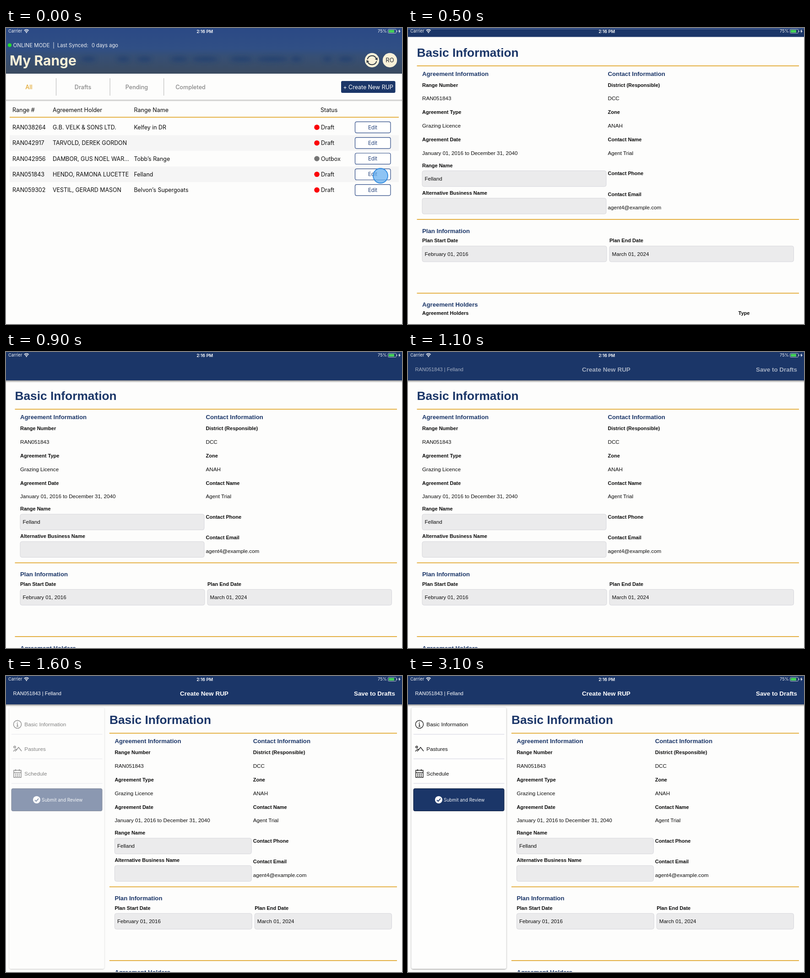
Write an HTML page that moves like this. It is 865 by 648 pixels and loops after 3.3 s.

```html
<!DOCTYPE html>
<html lang="en">
<head>
<meta charset="utf-8">
<title>Range plans</title>
<style>
  html, body { margin: 0; width: 100%; height: 100%; overflow: hidden; background: #fdfdfc; }
  svg { display: block; width: 865px; height: 648px; }
  text { font-family: "Liberation Sans", Arial, sans-serif; white-space: pre; }
  .ui { font-family: Inter, sans-serif; }
</style>
</head>
<body>
<svg id="stage" viewBox="0 0 865 648" xmlns="http://www.w3.org/2000/svg">
  <defs>
    <linearGradient id="sky" x2="0" y2="1">
      <stop offset="0" stop-color="#2b4985"/>
      <stop offset=".45" stop-color="#304f85"/>
      <stop offset=".6" stop-color="#364f76"/>
      <stop offset="1" stop-color="#3b4b60"/>
    </linearGradient>
    <linearGradient id="shade" x2="0" y2="1">
      <stop offset="0" stop-color="#000" stop-opacity=".42"/>
      <stop offset="1" stop-color="#000" stop-opacity="0"/>
    </linearGradient>
    <filter id="blur" x="-50%" y="-100%" width="200%" height="300%"><feGaussianBlur stdDeviation="4"/></filter>
    <filter id="lift" x="-5%" y="-5%" width="110%" height="110%">
      <feDropShadow dx="0" dy="1" stdDeviation="1.6" flood-opacity=".45"/>
    </filter>
  </defs>
</svg>
<script>
const NAVY = "#1b3668", GOLD = "#e2a830", PAPER = "#fdfdfc", CREAM = "#faf1d8", INK = "#0c0c0c";
const LOOP = 3300, STEP = 100;
const stage = document.getElementById("stage");

function add(parent, tag, attrs = {}, content) {
  const node = document.createElementNS("http://www.w3.org/2000/svg", tag);
  set(node, attrs);
  if (content !== undefined) node.textContent = content;
  parent.append(node);
  return node;
}
function set(node, attrs) {
  for (const key in attrs) node.setAttribute(key, attrs[key]);
}
const group = (parent, attrs) => add(parent, "g", attrs);
const rect = (parent, x, y, width, height, attrs) => add(parent, "rect", { x, y, width, height, ...attrs });
const circle = (parent, cx, cy, r, attrs) => add(parent, "circle", { cx, cy, r, ...attrs });
const path = (parent, d, attrs) => add(parent, "path", { d, fill: "none", ...attrs });
const text = (parent, x, y, size, content, attrs) =>
  add(parent, "text", { x, y, "font-size": size, fill: INK, ...attrs }, content);
const ui = (parent, x, y, size, content, attrs) => text(parent, x, y, size, content, { class: "ui", ...attrs });
const bold = (parent, x, y, size, content, attrs) =>
  text(parent, x, y, size, content, { "font-weight": 700, ...attrs });

const PLAN_ID = "RAN051843", PLAN_NAME = "Felland";

function buildList() {
  const list = group(stage);
  rect(list, 0, 0, 865, 648, { fill: PAPER });
  rect(list, 0, 157, 865, 4, { fill: "url(#shade)", opacity: .6 });
  rect(list, 0, 0, 865, 100, { fill: "url(#sky)" });

  const haze = group(list, { fill: "#24406f", filter: "url(#blur)", opacity: .75 });
  for (const [x, w] of [[180, 16], [256, 14], [302, 16], [378, 18], [435, 28], [514, 24], [582, 34], [634, 12], [702, 10], [742, 16]])
    add(haze, "ellipse", { cx: x, cy: 68, rx: w, ry: 6 });

  circle(list, 8, 37.5, 4, { fill: "#22e02c" });
  ui(list, 15.5, 41.8, 11.5, "ONLINE MODE", { fill: "#eef0f3" });
  rect(list, 103.5, 31, 1, 14, { fill: "#dfe3ea" });
  ui(list, 112, 41.8, 11.1, "Last Synced:", { fill: "#eef0f3" });
  ui(list, 187, 41.8, 11.1, "0 days ago", { fill: "#eef0f3" });
  ui(list, 8, 82, 30, "My Range", { fill: CREAM, "font-weight": 700 });

  circle(list, 799.5, 70.5, 15.7, { fill: CREAM });
  path(list, "M789.5 68.5A10.3 10.3 0 0 1 808.5 66M809.5 72.5A10.3 10.3 0 0 1 790.5 75",
    { stroke: "#333b44", "stroke-width": 2 });
  path(list, "M811.5 64.5v6.5l-6-3zM787.5 76.5v-6.5l6 3z", { fill: "#333b44" });
  circle(list, 838.5, 70.5, 15.7, { fill: CREAM });
  ui(list, 838.5, 75, 13, "RO", { "text-anchor": "middle", fill: "#222a33" });

  [["All", 50, GOLD], ["Drafts", 168, "#878787"], ["Pending", 285.5, "#878787"], ["Completed", 403, "#878787"]]
    .forEach(([label, x, fill], i) => {
      ui(list, x, 134, 12.6, label, { fill, "font-weight": 500, "text-anchor": "middle" });
      if (i) rect(list, i * 117.6 - 8.6, 110, 1, 38, { fill: "#b4b4b4" });
    });
  rect(list, 732, 116, 118.5, 26, { rx: 3, fill: NAVY });
  ui(list, 791.2, 133.5, 12.45, "+ Create New RUP", { fill: "#fff", "text-anchor": "middle" });

  [["Range #", 14], ["Agreement Holder", 102], ["Range Name", 279.5], ["Status", 687]]
    .forEach(([label, x]) => ui(list, x, 183.5, 12.5, label));
  rect(list, 8, 194.5, 850, 1.8, { fill: GOLD });

  [
    ["RAN038264", "G.B. VELK & SONS LTD.", "Kelfey in DR", "Draft"],
    ["RAN042917", "TARVOLD, DEREK GORDON", "", "Draft"],
    ["RAN042956", "DAMBOR, GUS NOEL WAR...", "Tobb’s Range", "Outbox"],
    [PLAN_ID, "HENDO, RAMONA LUCETTE", PLAN_NAME, "Draft"],
    ["RAN059302", "VESTIL, GERARD MASON", "Belvon’s Supergoats", "Draft"]
  ].forEach(([id, holder, name, status], i) => {
    const y = 217.4 + i * 34.3;
    if (i % 2) rect(list, 8, y - 17, 850, 34, { fill: "#f5f5f5" });
    ui(list, 14, y + 4.6, 12.5, id);
    ui(list, 102, y + 4.6, 12.45, holder);
    ui(list, 279.5, y + 4.6, 12.4, name);
    circle(list, 679, y, 5.8, { fill: status === "Draft" ? "#fb0207" : "#767676" });
    ui(list, 688, y + 4.6, 12.5, status);
    rect(list, 762.5, y - 12, 77.5, 24.2, { rx: 3.5, fill: "#fff", stroke: "#2c4a86", "stroke-width": 1.2 });
    ui(list, 801, y + 4.1, 11.3, "Edit", { fill: "#24427c", "text-anchor": "middle" });
  });
}

buildList();
const touch = circle(stage, 818, 323.5, 16, { fill: "#63aef0", "fill-opacity": .72, stroke: "#2f8ae0", "stroke-width": 1.8 });

// Plan sheet: left items follow the full side shift, right items half of it.
const sheet = group(stage);
rect(sheet, 0, 0, 865, 648, { fill: PAPER });
const body = group(sheet);
const rules = [63.3, 399.5, 561].map(y => rect(body, 20, y - .9, 834, 1.8, { fill: GOLD }));
const fields = [[31, 293, 402, 0], [31, 353, 402, 0], [31, 457.7, 403, 0], [440, 457.7, 402.5, 1]]
  .map(([x, y, width, right]) => ({
    x, width, right,
    node: rect(body, x, y, width, 34.5, { rx: 4, fill: "#ebebec", stroke: "#d7d7dc", "stroke-width": 1 })
  }));
const left = group(body), right = group(body);

const heading = (side, x, y, label) => bold(side, x, y, 13.2, label, { fill: NAVY });
const label = (side, x, y, content) => bold(side, x, y, 11, content);
const value = (side, x, y, content) => text(side, x, y, 11.65, content);

bold(left, 19.5, 43, 26.3, "Basic Information", { fill: NAVY });
heading(left, 31, 85, "Agreement Information");
label(left, 31, 109, "Range Number");
value(left, 31, 138.7, PLAN_ID);
label(left, 31, 168.7, "Agreement Type");
value(left, 31, 198.7, "Grazing Licence");
label(left, 31, 228.5, "Agreement Date");
value(left, 31, 258.3, "January 01, 2016 to December 31, 2040");
label(left, 31, 285, "Range Name");
value(left, 36.5, 314.3, PLAN_NAME);
label(left, 31, 345, "Alternative Business Name");
heading(left, 31, 429, "Plan Information");
label(left, 31, 449.7, "Plan Start Date");
value(left, 36.5, 479, "February 01, 2016");
heading(left, 31, 590.5, "Agreement Holders");
label(left, 31, 608.7, "Agreement Holders");

heading(right, 436.5, 85, "Contact Information");
label(right, 436.5, 109, "District (Responsible)");
value(right, 436.5, 138.7, "DCC");
label(right, 436.5, 168.7, "Zone");
value(right, 436.5, 198.7, "ANAH");
label(right, 436.5, 228.5, "Contact Name");
value(right, 436.5, 258.3, "Agent Trial");
label(right, 436.5, 302.6, "Contact Phone");
label(right, 436.5, 348, "Contact Email");
value(right, 436.5, 377.8, "agent4@example.com");
label(right, 440, 449.7, "Plan End Date");
value(right, 445.5, 479, "March 01, 2024");
label(right, 721.5, 608.7, "Type");

const bar = rect(sheet, 0, 0, 865, 17, { fill: NAVY });
const barShade = rect(sheet, 0, 0, 865, 5, { fill: "url(#shade)" });
const barLabels = group(sheet);
text(barLabels, 15.5, 42.2, 11.05, `${PLAN_ID} | ${PLAN_NAME}`, { fill: "#fff" });
bold(barLabels, 433, 43.2, 13.5, "Create New RUP", { fill: "#fff", "text-anchor": "middle" });
bold(barLabels, 850, 43.2, 13.4, "Save to Drafts", { fill: "#fff", "text-anchor": "end" });

const menu = group(sheet);
rect(menu, 7.5, 69, 207, 572, { rx: 4, fill: "#fefefd", filter: "url(#lift)" });
["Basic Information", "Pastures", "Schedule"].forEach((name, i) => {
  const y = 106 + i * 53.8;
  text(menu, 40.3, y + 4.4, 11.8, name);
  rect(menu, 12, y + 21, 198.5, 1.1, { fill: "#d5d5e2" });
});
const icons = group(menu, { stroke: "#1c1c1c", "stroke-width": 1.4, fill: "none" });
circle(icons, 25, 105.8, 8.6);
path(icons, "M25 104v6M23.5 104.3h1.5M23 110h4M25 100.6v1.6");
circle(icons, 19, 155.5, 2);
path(icons, "M16 165l5-5 3.5 2M20 165l7.5-9 6.5 8.5");
path(icons, "M17 206.5h16v15.5h-16zM17 211.5h16M21 204v4M29 204v4");
path(icons, "M20 215h10M20 218.8h10", { "stroke-width": 2.2, "stroke-dasharray": "2.2 1.7" });
rect(menu, 12, 246.5, 198, 49, { rx: 3, fill: NAVY, stroke: "#10203f", "stroke-width": 1 });
circle(menu, 67, 271, 8, { fill: "#fff" });
path(menu, "M63 271.3l2.9 2.8 5.2-5.8", { stroke: NAVY, "stroke-width": 1.8 });
ui(menu, 78, 274.7, 9.95, "Submit and Review", { fill: "#eef1f6" });

function buildStatusBar() {
  const status = group(stage, { fill: "#fff" });
  ui(status, 5, 10.4, 9.3, "Carrier", { fill: "#f1f3f6" });
  path(status, "M39.8 5.6a7 7 0 0 1 9.8 0M41.7 7.8a4.3 4.3 0 0 1 6 0", { stroke: "#fff", "stroke-width": 1.5 });
  path(status, "M44.7 11.2l-1.7-1.8a2.4 2.4 0 0 1 3.4 0z", { fill: "#fff" });
  ui(status, 434.2, 10.6, 9.4, "2:16 PM", { fill: "#fff", "font-weight": 600, "text-anchor": "middle" });
  ui(status, 832, 10.4, 9.4, "75%", { fill: "#f1f3f6", "text-anchor": "end" });
  rect(status, 834.5, 2.8, 18, 8.6, { rx: 1.8, fill: "none", stroke: "#c9d0dc", "stroke-width": .9 });
  rect(status, 836, 4.3, 12, 5.6, { rx: .6, fill: "#45d158" });
  rect(status, 853.3, 5.5, 1.3, 3.2, { rx: .6, fill: "#c9d0dc" });
  path(status, "M860.2 2.8l-3.4 4.8h2.3l-.9 3.8 3.6-5h-2.3z", { fill: "#fff" });
}
buildStatusBar();

const clamp = v => Math.min(1, Math.max(0, v));
const span = (t, from, to) => clamp((t - from) / (to - from));
function ease(p) {
  return p < .5 ? 2 * p * p : 1 - 2 * (1 - p) * (1 - p);
}
const move = (t, from, to) => ease(span(t, from, to));

function render(t) {
  const top = 648 * (1 - move(t, 120, 518));
  const grown = move(t, 498, 900);
  const height = 16.9 + 45.1 * grown;
  const shift = 206.4 * move(t, 1200, 1470);

  touch.setAttribute("opacity", 1 - span(t, 40, 200));
  set(sheet, { transform: `translate(0 ${top})` });
  set(body, { transform: `translate(0 ${height})` });
  set(bar, { height });
  set(barShade, { y: height, opacity: grown });
  set(barLabels, { opacity: move(t, 935, 1235) });

  set(left, { transform: `translate(${shift} 0)` });
  set(right, { transform: `translate(${shift / 2} 0)` });
  rules.forEach(rule => set(rule, { x: 19.5 + shift, width: 834.5 - shift }));
  fields.forEach(f => set(f.node, { x: f.x + (f.right ? shift / 2 : shift), width: f.width - shift / 2 }));
  set(menu, { opacity: move(t, 1450, 1750) });
}

// The picture advances in steps of a tenth of a second.
const start = performance.now();
function tick() {
  const t = (performance.now() - start) % LOOP;
  render(Math.floor(t / STEP) * STEP);
  requestAnimationFrame(tick);
}
render(0);
requestAnimationFrame(tick);
</script>
</body>
</html>
```
